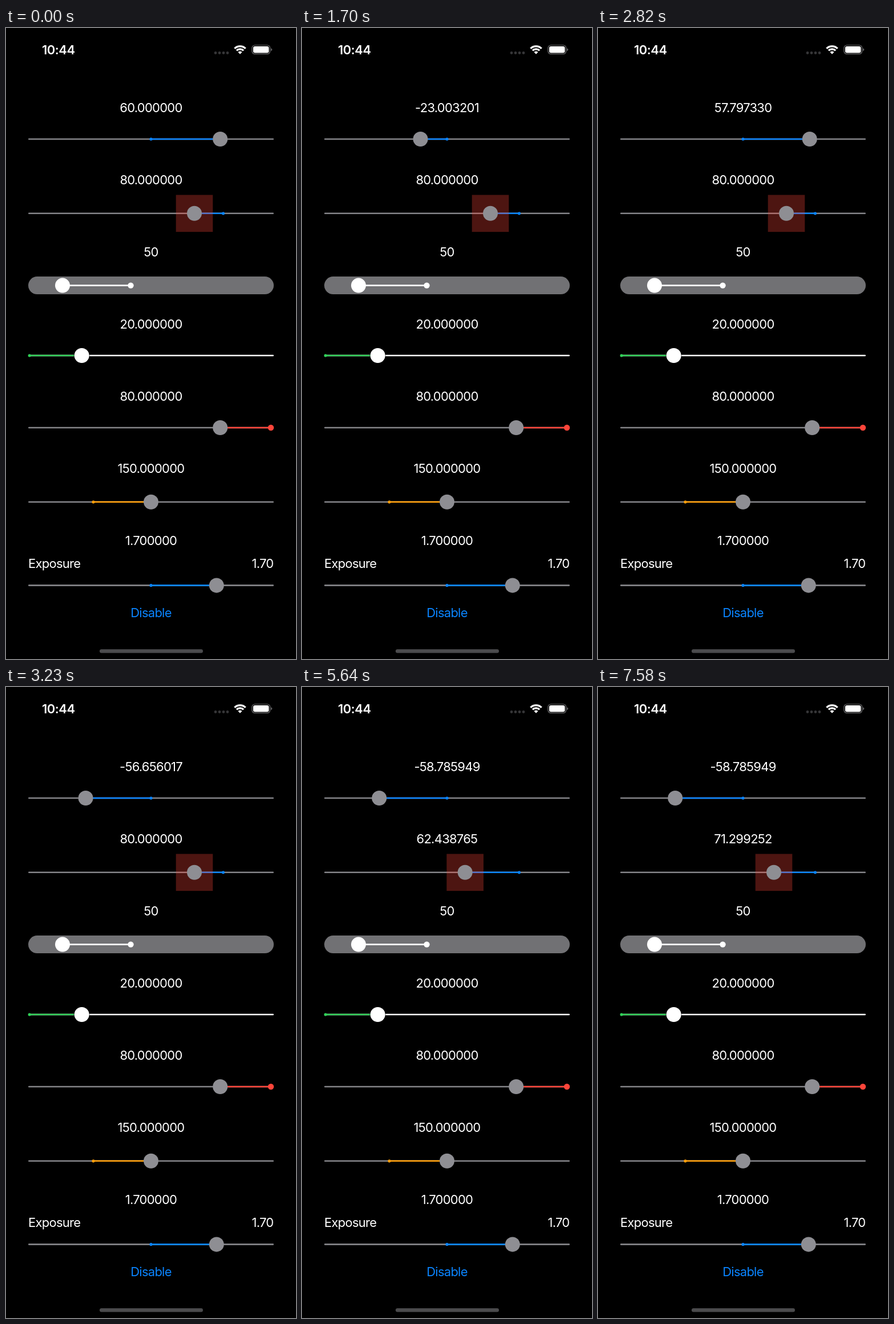
Recreate the animation shown at these times as an HTML page. Size 508x1102 px, loop 8000 ms.

```html
<!DOCTYPE html>
<html lang="en">
<head>
<meta charset="utf-8">
<title>Sliders</title>
<style>
  html, body { margin: 0; width: 100%; height: 100%; overflow: hidden; background: #000; }
  svg { display: block; width: 100%; height: 100%; }
  text { font: 400 22px Inter, sans-serif; letter-spacing: -0.75px; fill: #fff; }
  .mid { text-anchor: middle; }
  .end { text-anchor: end; }
  .clock { font-weight: 600; letter-spacing: -0.5px; }
  .link { fill: #0a84ff; }
</style>
</head>
<body>
<svg id="stage" viewBox="0 0 508 1102">
  <text class="clock" x="63" y="46">10:44</text>
  <g fill="#363638">
    <circle cx="367" cy="43.5" r="2.4"/><circle cx="374" cy="43.5" r="2.4"/>
    <circle cx="381" cy="43.5" r="2.4"/><circle cx="388" cy="43.5" r="2.4"/>
  </g>
  <g fill="none" stroke="#fff" stroke-width="3.2">
    <path d="M400.4 35.9A13.6 13.6 0 0 1 419.6 35.9"/>
    <path d="M403.9 39.4A8.6 8.6 0 0 1 416.1 39.4"/>
  </g>
  <path fill="#fff" d="M410 45.8L406.4 42.1A5 5 0 0 1 413.6 42.1Z"/>
  <rect x="431" y="30" width="31.5" height="15.4" rx="4.8" fill="none" stroke="#727274" stroke-width="1.2"/>
  <rect x="433" y="32" width="27.5" height="11.4" rx="3.2" fill="#fff"/>
  <path fill="#727274" d="M464.2 35.2Q466.2 36 466.2 37.8T464.2 40.4Z"/>
  <g id="sliders"></g>
  <text x="39" y="943">Exposure</text>
  <text class="end" x="468.5" y="943">1.70</text>
  <text class="mid link" x="254" y="1029">Disable</text>
  <rect x="164" y="1085" width="181" height="6.6" rx="3.3" fill="#4b4b4d"/>
</svg>
<script>
const LOOP = 8000;
const GRAY = '#8e8e93', BLUE = '#0a84ff', WHITE = '#fff';
const root = document.getElementById('sliders');

function add(tag, attrs, text) {
  const el = document.createElementNS('http://www.w3.org/2000/svg', tag);
  for (const key in attrs) el.setAttribute(key, attrs[key]);
  if (text) el.textContent = text;
  return root.appendChild(el);
}

function slider({ label, textY, y, anchor, x, color, dot = 2.6, knob = GRAY, track = '#848488', thick = 2.6, zone, shadow }) {
  const caption = add('text', { class: 'mid', x: 254, y: textY }, label);
  add('rect', { x: 39, y: y - thick / 2, width: 430, height: thick, rx: thick / 2, fill: track });
  const fill = add('line', { x1: anchor, x2: x, y1: y, y2: y, stroke: color, 'stroke-width': 2.6 });
  add('circle', { cx: anchor, cy: y, r: dot, fill: color });
  const area = zone && add('rect', { y: y - 32.3, width: 64.6, height: 64.6, fill: '#ff453a', opacity: 0.3 });
  if (shadow) add('circle', { cx: x, cy: y + 0.4, r: 14.2, fill: '#000', opacity: 0.45 });
  const thumb = add('circle', { cy: y, r: 13, fill: knob });

  function move(px) {
    fill.setAttribute('x2', px);
    thumb.setAttribute('cx', px);
    if (area) area.setAttribute('x', px - 32.3);
  }
  move(x);
  return (value, px) => {
    caption.textContent = value.toFixed(6);
    move(px);
  };
}

const setFirst = slider({ label: '60.000000', textY: 147, y: 194, anchor: 254, x: 375.2, color: BLUE });
const setSecond = slider({ label: '80.000000', textY: 273, y: 323.8, anchor: 380.5, x: 330, color: BLUE, zone: true });
slider({ label: '50', textY: 399, y: 449.6, anchor: 218.5, x: 99, color: WHITE, dot: 5.2, knob: WHITE, track: '#717174', thick: 31 });
slider({ label: '20.000000', textY: 525, y: 572, anchor: 41.2, x: 132.7, color: '#30d158', knob: WHITE, track: WHITE, shadow: true });
slider({ label: '80.000000', textY: 651, y: 698, anchor: 464, x: 375.2, color: '#ff453a', dot: 5.2 });
slider({ label: '150.000000', textY: 777, y: 827.8, anchor: 153, x: 254, color: '#ff9f0a' });
slider({ label: '1.700000', textY: 903, y: 973.4, anchor: 254, x: 368.8, color: BLUE });

const ease = {
  hold: () => 0,
  start: p => 1 - Math.cos(p * Math.PI / 2),
  stop: p => Math.sin(p * Math.PI / 2),
  both: p => (1 - Math.cos(p * Math.PI)) / 2
};

// Each row: time, value, easing towards the next row.
const firstDrag = [
  [0, 60, 'hold'], [1350, 60, 'start'], [1700, -23.003201, 'stop'],
  [2000, -78.416293, 'start'], [2350, 11.075612, 'stop'],
  [2670, 80.714382, 'both'], [3230, -56.656017, 'hold'], [5290, -58.785949, 'hold']
];
const secondDrag = [
  [0, 80, 'hold'], [5290, 71.128860, 'both'], [5990, 53.748669, 'hold'],
  [7400, 53.748669, 'stop'], [7580, 71.299252, 'hold']
];

function valueAt(rows, t) {
  const i = rows.findLastIndex(row => row[0] <= t);
  const [t0, v0, kind] = rows[i];
  if (i === rows.length - 1) return v0;
  const [t1, v1] = rows[i + 1];
  return v0 + (v1 - v0) * ease[kind]((t - t0) / (t1 - t0));
}

// The picture refreshes in bursts: first time, last time, number of refreshes.
const ticks = [0];
for (const [from, to, count] of [[1410, 2170, 14], [2230, 3000, 14], [3050, 3230, 4], [5290, 5990, 13], [7460, 7580, 3]]) {
  for (let i = 0; i < count; i++) {
    ticks.push(Math.round((from + (to - from) * i / (count - 1)) / 10) * 10);
  }
}

let begin;
function draw(now) {
  begin ??= now;
  const time = Math.max(0, now - begin) % LOOP;
  const tick = ticks.findLast(t => t <= time);
  const a = valueAt(firstDrag, tick);
  const b = valueAt(secondDrag, tick);
  setFirst(a, 254 + a * 2.02);
  setSecond(b, 330 + (b - 80) * 2.525);
  requestAnimationFrame(draw);
}
draw(performance.now());
</script>
</body>
</html>
```
